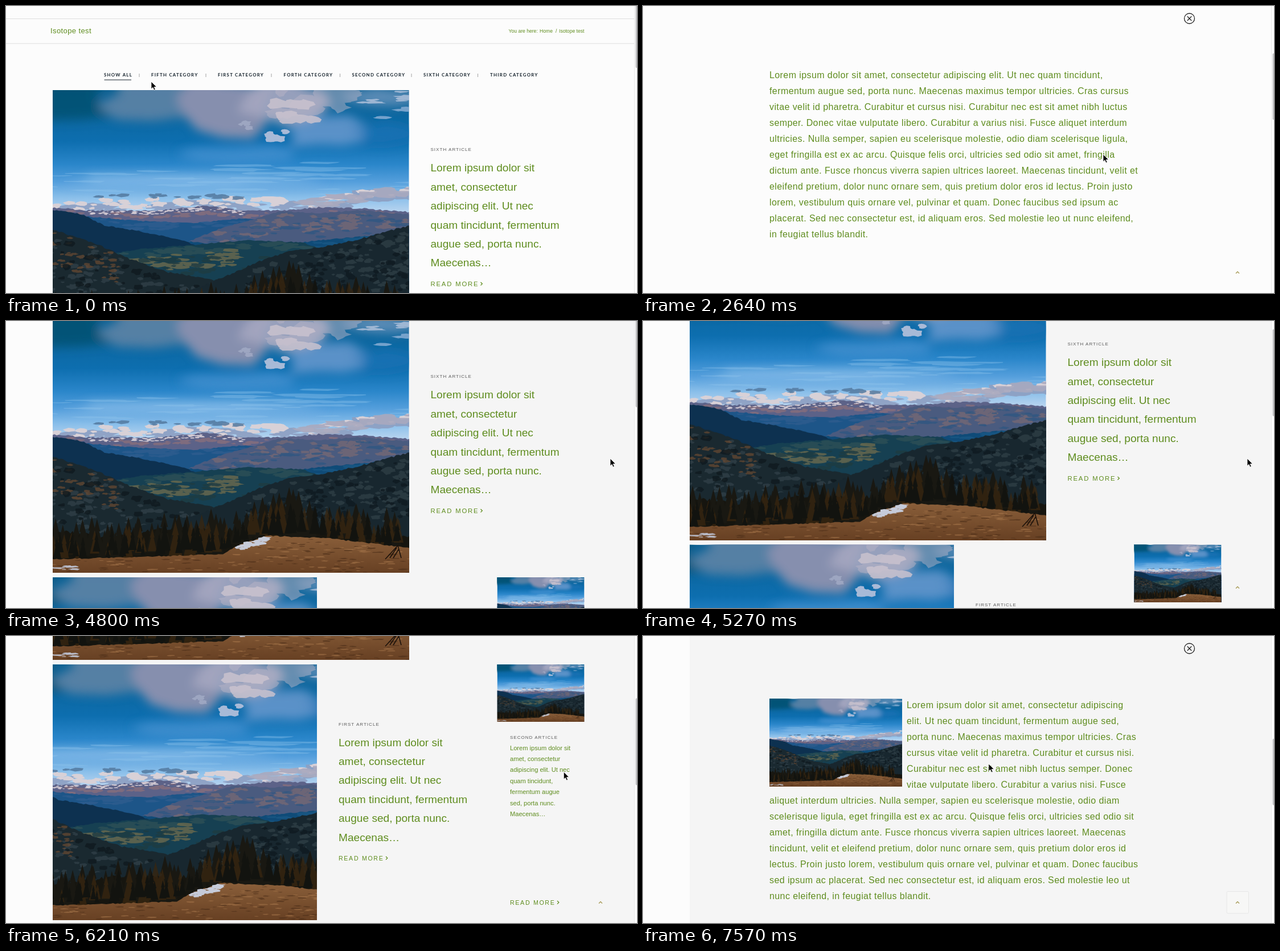
An HTML page that plays this animation: 1108 by 505 pixels, repeating every 8000 ms.

```html
<!DOCTYPE html>
<html lang="en">
<head>
<meta charset="utf-8">
<title>Isotope test</title>
<style>
  html, body { margin: 0; width: 100%; height: 100%; overflow: hidden; background: #fcfcfc; }
  svg#stage { display: block; width: 100vw; height: 100vh; }
  text { font-family: "Liberation Sans", Arial, sans-serif; fill: #5f8d1f; white-space: pre; }
  .title { font-size: 13px; letter-spacing: .4px; }
  .crumb { font-size: 8.6px; }
  .nav { font: 700 7.8px Lato, sans-serif; letter-spacing: 1.28px; fill: #14212b; }
  .label { font-size: 8px; letter-spacing: 1.03px; fill: #5c5c5c; }
  .big { font-size: 19.1px; }
  .small { font-size: 11.1px; }
  .more { font-size: 11.3px; letter-spacing: 1.83px; }
  .less { font-size: 10.6px; letter-spacing: 1.7px; }
  .body { font-size: 16px; letter-spacing: .41px; }
  .line { fill: none; stroke: #5f8d1f; stroke-width: 1.3; }
</style>
</head>
<body>
<svg id="stage" viewBox="0 0 1108 505" preserveAspectRatio="none">
  <defs>
    <linearGradient id="sky" x2="0" y2="1">
      <stop offset="0" stop-color="#0c6193"/>
      <stop offset=".2" stop-color="#0d6eaf"/>
      <stop offset=".29" stop-color="#2a86ca"/>
      <stop offset=".36" stop-color="#559fdc"/>
      <stop offset=".42" stop-color="#8abfea"/>
      <stop offset=".47" stop-color="#b3d2ef"/>
    </linearGradient>
    <linearGradient id="grass" x2="0" y2="1">
      <stop offset="0" stop-color="#8a5f3a"/>
      <stop offset="1" stop-color="#674023"/>
    </linearGradient>
    <filter id="soft" x="-30%" y="-30%" width="160%" height="160%">
      <feGaussianBlur stdDeviation="9"/>
    </filter>
    <g id="scene"></g>
  </defs>
  <rect width="1108" height="505" fill="#fcfcfc"/>
  <rect id="panel" x="82" width="1021" height="505" fill="#f5f5f5"/>
  <g id="page"></g>
  <path d="M1103.5 0V505" stroke="#e9e9e9"/>
  <rect id="thumb" x="1105.5" width="4" rx="2" fill="#c2c2c4"/>
  <rect id="upBox" x="1025" y="449.5" width="38.5" height="38.5" rx="2" fill="#f7f7f6" stroke="#e6e6e6"/>
  <path id="up" d="M1041 470.5l3-3 3 3" fill="none" stroke="#a79a55" stroke-width="1.3"/>
  <path id="arrow" d="M0 0V13L3 10.3 5 15 7.2 14 5.2 9.5H9.4Z" fill="#000" stroke="#fff" stroke-width=".8"/>
  <path id="hand" d="M-1 8V1.5Q-1-.3.2-.3T1.4 1.5V5Q2.5 4.2 3.6 5.2 5 4.6 5.8 5.8 7.4 5.4 7.6 7V10L6 14H.8L-2.8 9.5Q-5.6 6.8-4.2 6.3T-1 8ZM1.6 9v3M3.6 9v3M5.4 9v3" fill="#fff" stroke="#111"/>
</svg>
<script>
const $ = id => document.getElementById(id);
const LOOP = 8000;

// Piecewise linear lookup: keys are [position, ...values].
function lerp(keys, x) {
  let i = 0;
  while (i < keys.length - 2 && x > keys[i + 1][0]) i++;
  const [a, ...from] = keys[i], [b, ...to] = keys[i + 1];
  const p = Math.min(1, Math.max(0, (x - a) / (b - a)));
  return from.map((v, k) => v + (to[k] - v) * p);
}

// ---------- landscape ----------
let seed = 7;
const rand = (a, b) => a + (b - a) * (seed = seed * 16807 % 2147483647) / 2147483647;
const n1 = v => v.toFixed(1);
const path = (d, fill, opacity = 1) => `<path d="${d}" fill="${fill}" opacity="${opacity}"/>`;

function blob(x, y, rx, ry) {
  const pts = [];
  for (let i = 0; i < 11; i++) {
    const a = i / 11 * Math.PI * 2, k = rand(.6, 1.15);
    pts.push(n1(x + Math.cos(a) * rx * k) + ' ' + n1(y + Math.sin(a) * ry * k));
  }
  return 'M' + pts.join('L') + 'Z';
}

function ridge(pts, rough) {
  let d = 'M-25 450';
  for (let x = -25; x <= 651; x += 4) d += `L${x} ${n1(lerp(pts, x)[0] + rand(-rough, rough))}`;
  return d + 'V450Z';
}

// Ragged patches that follow a line, between two depths below it.
function scatter(n, pts, x0, x1, y0, y1, rx, ry) {
  let d = '';
  while (n--) {
    const x = rand(x0, x1), k = rand(.4, 1.2);
    d += blob(x, lerp(pts, x)[0] + rand(y0, y1), rx * k, ry * k);
  }
  return d;
}

function spruce(x, base, h) {
  const w = h * .2;
  return `M${n1(x)} ${n1(base - h)}l${n1(w * .5)} ${n1(h * .4)}h${n1(-w * .2)}l${n1(w * .7)} ${n1(h * .6)}` +
    `h${n1(-w * 2)}l${n1(w * .7)} ${n1(-h * .6)}h${n1(-w * .2)}z`;
}

function forest(n, ground, tall) {
  let d = '';
  while (n--) {
    const x = rand(-25, 610);
    const grove = (x > 195 && x < 290) || (x > 365 && x < 470) ? 1.35 : 1;
    d += spruce(x, lerp(ground, x)[0] + rand(-14, 3), rand(.5, 1) * tall * grove);
  }
  return d;
}

function landscape() {
  const flat = y => [[-25, y], [651, y]];
  const band = [[-25, 208], [100, 198], [300, 199], [470, 196], [560, 180], [651, 172]];
  const far = [[-25, 205], [70, 212], [180, 212], [270, 204], [330, 212], [400, 212], [470, 206], [540, 208], [651, 216]];
  const foot = [[-25, 225], [60, 222], [150, 230], [250, 234], [330, 226], [651, 240]];
  const brown = [[-25, 300], [225, 272], [290, 245], [350, 228], [400, 213], [470, 217], [540, 211], [651, 221]];
  const valley = [[-25, 225], [120, 252], [200, 263], [300, 272], [420, 270], [480, 263], [560, 256], [651, 240]];
  const left = [[-25, 206], [0, 211], [50, 218], [90, 238], [150, 248], [220, 262], [300, 290], [400, 320], [651, 400]];
  const mid = [[-25, 300], [80, 292], [150, 280], [250, 272], [340, 264], [440, 268], [500, 290], [651, 300]];
  const near = [[-25, 240], [20, 252], [80, 272], [130, 295], [200, 320], [290, 335], [651, 360]];
  const right = [[-25, 400], [250, 350], [310, 325], [360, 302], [420, 282], [480, 275], [540, 262], [600, 245], [651, 232]];
  const woods = [[-25, 372], [100, 388], [210, 370], [300, 374], [420, 364], [500, 378], [651, 390]];
  const meadow = [[-25, 427], [150, 422], [300, 417], [325, 402], [375, 385], [480, 389], [626, 406], [651, 410]];
  const soft = [
    [20, 10, 90, 60, '#05506f', .8], [190, 14, 120, 50, '#5d83a6', .9], [310, 30, 90, 55, '#868fae', 1],
    [420, 22, 90, 48, '#a6a7c0', .9], [480, 75, 90, 30, '#6f9bd0', .8], [330, 115, 130, 18, '#4a93d2', .7],
    [580, 12, 70, 18, '#6f97bf', .8], [590, 75, 70, 22, '#1a72b4', .8], [220, 160, 230, 10, '#9cc8ee', .7]
  ].map(([x, y, w, h, c, o]) => path(blob(x, y, w, h), c, o)).join('');

  return `<rect x="-25" width="676" height="450" fill="url(#sky)"/><g filter="url(#soft)">${soft}</g>` +
    path(scatter(16, flat(0), 380, 530, 0, 45, 30, 14), '#b7b3c6', .5) +
    path(scatter(12, flat(30), 395, 470, -14, 28, 17, 9), '#c9c2ce', .85) +
    path(scatter(9, flat(80), 376, 410, -7, 9, 13, 7), '#b9c3dc', .9) +
    path(scatter(5, flat(64), 328, 345, -6, 6, 9, 5), '#a3abc6', .8) +
    path(scatter(10, [[540, 24], [651, 4]], 545, 645, -8, 8, 22, 3), '#b3c4dc', .8) +
    path(scatter(5, [[570, 44], [651, 26]], 575, 640, -4, 6, 18, 3), '#8fb1d6', .8) +
    path(scatter(34, flat(160), -25, 651, -35, 25, 55, 2.5), '#8fc2ec', .4) +
    path(scatter(60, band, -25, 651, -2, 16, 26, 6), '#8d9fc1', .9) +
    path(scatter(70, band, -25, 651, -8, 9, 15, 5), '#d8d1d7') +
    path(scatter(16, band, 70, 330, -16, -8, 12, 3), '#54799f', .85) +
    path(scatter(26, band, 440, 651, -4, 12, 24, 5), '#a9a9be', .9) +
    path(ridge(far, 1.4), '#5c6288') +
    path(scatter(60, far, -25, 651, 3, 16, 12, 3), '#8b6f7b', .75) +
    path(scatter(80, far, 50, 340, 1, 7, 5, 1.3), '#ddd3da', .9) +
    path(ridge(foot, 1), '#1d5588') +
    path(scatter(40, foot, -25, 400, 2, 16, 16, 3), '#315f90', .7) +
    path(ridge(brown, 1), '#4a5b7f') +
    path(scatter(90, brown, 290, 651, 5, 34, 11, 4), '#7b6a73', .7) +
    path(scatter(50, brown, 250, 651, 8, 44, 13, 3), '#2b5682', .7) +
    path(ridge(valley, 1), '#0f4b78') +
    path(scatter(30, valley, 100, 560, 3, 16, 20, 3), '#1c5b86', .7) +
    path(ridge(left, 1), '#0d3150') +
    path(ridge(mid, 1), '#164052') +
    path(scatter(40, mid, 120, 460, 3, 15, 18, 4), '#2f5257', .7) +
    path(scatter(46, mid, 140, 320, 14, 42, 17, 4), '#716c4c', .75) +
    path(scatter(30, mid, 150, 400, 20, 60, 14, 4), '#1f3b42', .8) +
    path(ridge(near, 1.5), '#1a2930') +
    path(scatter(130, near, -25, 330, 6, 110, 8, 4), '#33424a', .7) +
    path(scatter(50, near, -25, 120, 2, 60, 8, 3), '#6a4a32', .7) +
    path(scatter(60, near, -25, 330, 10, 110, 9, 5), '#101a1e', .8) +
    path(ridge(right, 1.5), '#18272f') +
    path(scatter(170, right, 340, 651, 6, 110, 8, 4), '#33424a', .65) +
    path(scatter(110, right, 340, 651, 6, 120, 8, 5), '#0e191f', .75) +
    path(ridge(woods, 4), '#16150f') +
    path(forest(90, meadow, 62), '#191812') +
    path(forest(55, meadow, 46), '#38260f', .75) +
    path(forest(70, meadow, 40), '#12130f') +
    path(ridge(meadow, 1), 'url(#grass)') +
    path(scatter(150, meadow, -25, 651, 4, 60, 9, 1.2), '#a5764a', .6) +
    path(scatter(150, meadow, -25, 651, 3, 60, 8, 1.2), '#4c2d18', .6) +
    path(scatter(22, [[318, 410], [372, 391]], 320, 374, -3, 4, 11, 3), '#c6cbd9') +
    path(scatter(14, flat(441), -25, 42, -4, 4, 11, 1.5), '#c0c6d6', .9) +
    '<path d="M584 426L606 402M592 424L604 406M606 402L612 424M598 424L608 408" stroke="#1c120b" stroke-width="1.6"/>';
}
$('scene').innerHTML = landscape();

// ---------- page ----------
const text = (x, y, cls, s) => `<text x="${x}" y="${y}" class="${cls}">${s}</text>`;
const rows = (x, y, gap, cls, list) => list.map((s, i) => text(x, y + i * gap, cls, s)).join('');
const photo = (x, y, w, h, crop) =>
  `<svg x="${x}" y="${y}" width="${w}" height="${h}" viewBox="${crop}" preserveAspectRatio="none"><use href="#scene"/></svg>`;
const FULL = '-25 0 676 450';

const more = (x, y, cls, id) => text(x, y, cls, 'READ MORE') +
  `<path id="${id}" class="line" d="M0-7l2.8 2.8-2.8 2.8"/>`;
const frame = (id, x, y, w, h) =>
  `<path id="${id}" d="M${x + w} ${y + 1.5}H${x + 1.5}V${y + h - 1.5}H${x + w}" fill="none" stroke="#f4f4f4" stroke-width="3"/>`;

const intro = ['Lorem ipsum dolor sit', 'amet, consectetur', 'adipiscing elit. Ut nec'];
const wide = [...intro, 'quam tincidunt, fermentum', 'augue sed, porta nunc.', 'Maecenas…'];
const narrow = [...intro, 'quam tincidunt,', 'fermentum augue', 'sed, porta nunc.', 'Maecenas…'];

const story = 'Lorem ipsum dolor sit amet, consectetur adipiscing elit. Ut nec quam tincidunt, fermentum augue sed, porta nunc. Maecenas maximus tempor ultricies. Cras cursus vitae velit id pharetra. Curabitur et cursus nisi. Curabitur nec est sit amet nibh luctus semper. Donec vitae vulputate libero. Curabitur a varius nisi. Fusce aliquet interdum ultricies. Nulla semper, sapien eu scelerisque molestie, odio diam scelerisque ligula, eget fringilla est ex ac arcu. Quisque felis orci, ultricies sed odio sit amet, fringilla dictum ante. Fusce rhoncus viverra sapien ultrices laoreet. Maecenas tincidunt, velit et eleifend pretium, dolor nunc ornare sem, quis pretium dolor eros id lectus. Proin justo lorem, vestibulum quis ornare vel, pulvinar et quam. Donec faucibus sed ipsum ac placerat. Sed nec consectetur est, id aliquam eros. Sed molestie leo ut nunc eleifend, in feugiat tellus blandit.';

const pen = document.createElement('canvas').getContext('2d');
pen.font = '16px "Liberation Sans", Arial, sans-serif';

// Wraps the story; the first `beside` lines leave room for a picture.
function wrap(beside) {
  const lines = [''];
  for (const word of story.split(' ')) {
    const i = lines.length - 1, next = lines[i] ? lines[i] + ' ' + word : word;
    const room = i < beside ? 409 : 650;
    if (pen.measureText(next).width + next.length * .41 > room) lines.push(word);
    else lines[i] = next;
  }
  return lines;
}

const ARTICLE_H = 561, TOP_A = 603, TOP_B = 1064;
function article(id, top, fill, beside) {
  return `<g id="${id}"><rect x="82" y="${top}" width="933" height="${ARTICLE_H}" fill="${fill}"/>` +
    `<g transform="translate(959.5 ${top + 22})" fill="none" stroke="#222" stroke-width="1.3">` +
    '<circle r="9"/><path d="M-3.7-3.7L3.7 3.7M3.7-3.7L-3.7 3.7"/></g>' +
    (beside ? photo(222, top + 110.5, 233, 154.5, FULL) : '') +
    wrap(beside).map((s, i) => text(i < beside ? 463 : 222, top + 126.5 + 28 * i, 'body', s)).join('') + '</g>';
}

const menu = [[172, 'SHOW ALL'], [255, 'FIFTH CATEGORY'], [372, 'FIRST CATEGORY'], [487.5, 'FORTH CATEGORY'],
  [607.5, 'SECOND CATEGORY'], [733, 'SIXTH CATEGORY'], [850, 'THIRD CATEGORY']];

$('page').innerHTML =
  '<path d="M0 22.5H1103M0 66H1103" stroke="#dedede"/>' +
  text(78, 48, 'title', 'Isotope test') +
  text(882.5, 46.5, 'crumb', 'You are here:') + text(937, 46.5, 'crumb', 'Home') +
  text(965, 46.5, 'crumb', '/') + text(971, 46.5, 'crumb', 'Isotope test') +
  menu.map(([x, s]) => text(x, 124.3, 'nav', s)).join('') +
  '<path d="M234 119v6M351 119v6M466 119v6M586.5 119v6M712 119v6M828.5 119v6" stroke="#999" stroke-width=".9"/>' +
  '<path d="M172.5 130H220" stroke="#14212b"/>' +
  '<rect id="cardA" x="82" y="134" width="933" height="478" fill="#f4f4f4"/>' +
  photo(82, 148, 625.5, 450, '0 0 625.5 450') + frame('frameA', 82, 148, 625.5, 450) +
  text(745.5, 255, 'label', 'SIXTH ARTICLE') + rows(745.5, 291.3, 33.4, 'big', wide) +
  more(745.5, 493, 'more', 'chevA') +
  '<g id="row"><g id="first"><rect id="cardB" x="82" y="602" width="750" height="458" fill="#f4f4f4"/>' +
  photo(82, 606, 464, 450, '81 0 464 450') + frame('frameB', 82, 606, 464, 450) +
  text(584, 714, 'label', 'FIRST ARTICLE') + rows(584, 749.6, 33.4, 'big', wide) +
  more(584, 951, 'less', 'chevB') + '</g>' +
  photo(862.5, 606, 153, 101, FULL) +
  text(885, 737, 'label', 'SECOND ARTICLE') + rows(885, 756.5, 19.4, 'small', narrow) +
  more(885, 1029, 'less', 'chevC') + '</g>' +
  article('articleA', TOP_A, '#fcfcfc', 0) + article('articleB', TOP_B, '#f5f5f5', 6);

// ---------- motion ----------
const steps = [0, 150, 310, 470, 620, 780, 940, 1100, 1250, 1400, 1540, 2130, 2300, 2470, 2640,
  2960, 3130, 3300, 3470, 3770, 3910, 4060, 4210, 4360, 4510, 4800, 5120, 5300, 5490, 5680, 5890, 6060,
  6210, 6360, 6520, 6700, 6890, 7220, 7390, 7570];
const pointer = [[0, 255, 133], [310, 430, 190], [620, 780, 260], [780, 905, 330], [1100, 797, 418], [1540, 796, 491],
  [2130, 796, 491], [2640, 808, 261], [3470, 956, 22], [3910, 956, 22], [4800, 1061, 242], [6060, 1061, 242],
  [6890, 609, 226], [7570, 607, 225]];
const scrolling = [[2130, 0], [2640, TOP_A], [3620, TOP_A], [3910, 360], [4800, 155], [4960, 155],
  [5680, 412], [6060, 540], [6210, 556], [7050, 556], [7570, TOP_B]];
const openA = [[2130, 0], [2640, 1], [3620, 1], [3910, .426], [4210, 0]];
const openB = [[7050, 0], [7570, 1]];

const set = (id, attrs) => { for (const k in attrs) $(id).setAttribute(k, attrs[k]); };
const show = (id, on) => set(id, { display: on ? 'inline' : 'none' });
const move = (id, x, y) => set(id, { transform: `translate(${x} ${y})` });

function zoom(id, top, k) {
  const c = top + ARTICLE_H / 2;
  show(id, k > 0);
  set(id, { opacity: k, transform: `translate(548.5 ${c}) scale(${k}) translate(-548.5 ${-c})` });
}

function draw(t) {
  const [x, y] = lerp(pointer, t), [scroll] = lerp(scrolling, t);
  const [a] = lerp(openA, t), [b] = lerp(openB, t);
  const overA = t >= 150 && t <= 2130, overB = t >= 6520 && t < 7220;
  const hand = overB || (overA && t < 2130);

  move('page', 0, -scroll);
  move('row', 0, ARTICLE_H * a);
  set('first', { opacity: 1 - a * .5 });
  zoom('articleA', TOP_A, a);
  zoom('articleB', TOP_B, b);

  for (const id of ['cardA', 'frameA']) show(id, overA);
  for (const id of ['cardB', 'frameB']) show(id, overB);
  move('chevA', overA ? 838.5 : 833.5, 493);
  move('chevB', overB ? 672 : 667, 951);
  move('chevC', 968, 1029);

  show('panel', t >= 4360);
  show('up', scroll > 200);
  set('upBox', { opacity: b });
  const len = 153 - 36 * Math.max(a < .5 ? 0 : a, b);
  set('thumb', { y: scroll * len / 554 - 44, height: len });

  show('hand', hand);
  show('arrow', !hand);
  move('hand', x, y);
  move('arrow', x, y);
}

const start = performance.now();
let last = -1;
function tick() {
  const ms = (performance.now() - start) % LOOP;
  const t = steps.filter(s => s <= ms).pop();
  if (t !== last) draw(last = t);
  requestAnimationFrame(tick);
}
tick();
</script>
</body>
</html>
```
